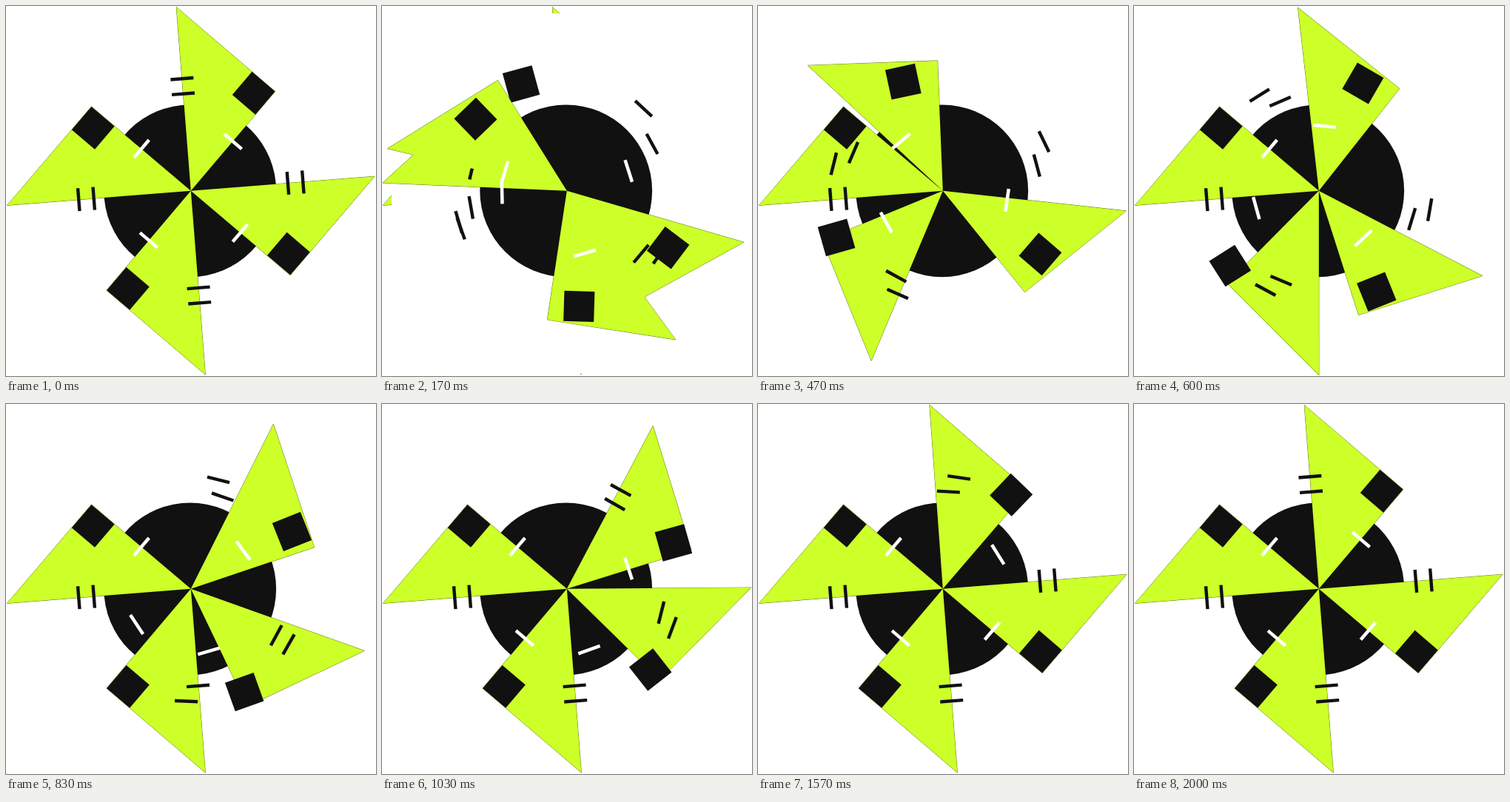
Recreate the animation shown at these times as an HTML page with a canvas. Size 500 by 500 pixels, loop 2.83 s.

```html
<!DOCTYPE html>
<html lang="en">
<head>
<meta charset="utf-8">
<title>Pinwheel</title>
<style>
  html, body { margin: 0; width: 100%; height: 100%; overflow: hidden; background: #fff; }
  canvas { display: block; width: 500px; height: 500px; }
</style>
</head>
<body>
<canvas id="stage" width="500" height="500"></canvas>
<script>
const ctx = document.getElementById('stage').getContext('2d');
const LOOP = 2830, STEP = 100 / 3, LAST = 60;
const CENTER = 249.8, OVERSHOOT = 1.65;
const DELAY = 0.08, STAGGER = 2.838; // in steps
const DARK = '#111', LIME = '#cdff29', EDGE = '#5d7413';
const DISC = { x: 248.7, y: 249.8, r: 116.4 };
const ARM_ANGLES = [175.5, 85.5, -4.5, -94.5];

const bar = x => [[x - 2.2, -15.5], [x + 2.2, -15.5], [x + 2.2, 15.5], [x - 2.2, 15.5]];

// Parts of one arm; the long side of the triangle lies on the x axis.
const PARTS = [
  { fill: LIME, edge: true, points: [[0, 0], [249, 0], [125, 124]] },
  { fill: DARK, points: [[125, 124], [154, 95], [125, 66], [96, 95]] },
  { fill: DARK, points: bar(131.5) },
  { fill: DARK, points: bar(152) },
  { fill: '#fff', points: [[49.4, 71.4], [71.4, 49.4], [74.6, 52.6], [52.6, 74.6]] }
];

function easeOutBack(p) {
  const u = Math.min(p, 1) - 1;
  return 1 + OVERSHOOT * u * u + (OVERSHOOT + 1) * u ** 3;
}

function rotate(points, degrees) {
  const a = degrees * Math.PI / 180, c = Math.cos(a), s = Math.sin(a);
  return points.map(([x, y]) => [CENTER + x * c - y * s, CENTER + x * s + y * c]);
}

// Every part makes one turn; each later part takes a little longer.
function pose(step) {
  return ARM_ANGLES.flatMap((angle, arm) => PARTS.map((part, i) => {
    const end = STAGGER * (arm * PARTS.length + i + 2);
    const turn = 360 * (easeOutBack((step - DELAY) / (end - DELAY)) - 1);
    return { ...part, points: rotate(part.points, angle + turn) };
  }));
}

function bounds(shapes) {
  const all = shapes.flatMap(s => s.points);
  const xs = all.map(p => p[0]).concat(DISC.x - DISC.r, DISC.x + DISC.r);
  const ys = all.map(p => p[1]).concat(DISC.y - DISC.r, DISC.y + DISC.r);
  const x = Math.floor(Math.min(...xs)), y = Math.floor(Math.min(...ys));
  return [x, y, Math.ceil(Math.max(...xs)) - x, Math.ceil(Math.max(...ys)) - y];
}

function trace(points) {
  ctx.beginPath();
  points.forEach(([x, y]) => ctx.lineTo(x, y));
  ctx.closePath();
}

function paint(shapes) {
  // Edges lie below everything, so they show only against the background.
  ctx.strokeStyle = EDGE;
  ctx.lineWidth = 1;
  for (const { points } of shapes.filter(s => s.edge)) {
    trace(points);
    ctx.stroke();
  }
  ctx.fillStyle = DARK;
  ctx.beginPath();
  ctx.arc(DISC.x, DISC.y, DISC.r, 0, Math.PI * 2);
  ctx.fill();
  for (const { points, fill } of shapes) {
    ctx.fillStyle = fill;
    trace(points);
    ctx.fill();
  }
}

const poses = Array.from({ length: LAST + 1 }, (_, k) => pose(k || LAST));
const boxes = poses.map(bounds);

// The resting figure stays visible until the area of a past step wipes it.
function render(step) {
  ctx.fillStyle = '#fff';
  ctx.fillRect(0, 0, 500, 500);
  paint(poses[0]);
  ctx.fillStyle = '#fff';
  for (let k = 1; k < step; k++) ctx.fillRect(...boxes[k]);
  if (step) paint(poses[step]);
}

const start = performance.now();
function tick() {
  const t = (performance.now() - start) % LOOP;
  const step = Math.floor((Math.floor(t / 10) * 10 + 5) / STEP);
  render(Math.min(step, LAST));
  requestAnimationFrame(tick);
}
tick();
</script>
</body>
</html>
```
